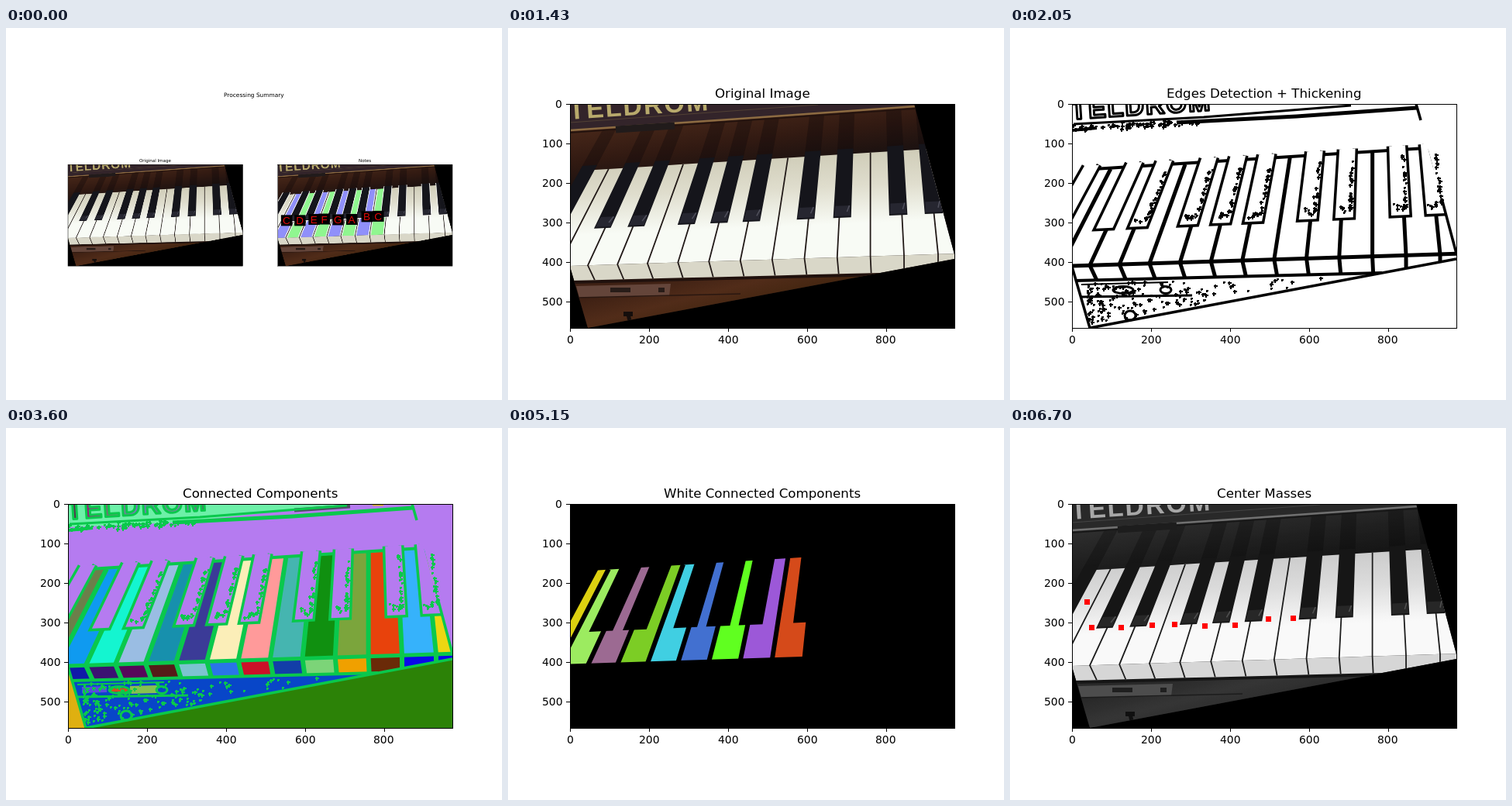
Animation, 640 px wide and 480 px high, one loop 8 s. Source, as an HTML page with a canvas:

```html
<!DOCTYPE html>
<html lang="en">
<head>
<meta charset="utf-8">
<title>Piano key detection</title>
<style>
html, body { margin: 0; width: 100%; height: 100%; overflow: hidden; background: #fff; }
canvas { display: block; width: 640px; height: 480px; }
</style>
</head>
<body>
<canvas id="stage" width="640" height="480"></canvas>
<script>
const W = 640, H = 480, LOOP = 8000;
const FONT = '"DejaVu Sans", Verdana, sans-serif';
const SANS = '"Liberation Sans", Arial, sans-serif';
const BOX = { x: 80, y: 98, w: 496, h: 289 };
const UNIT = 496 / 974;
const BRAND = 'TELDROM';

// Tilted photo inside the black plot area
const SHEET = [[80, 98], [524, 98], [576, 292], [576, 298], [103, 387], [80, 308]];
const WOOD = [[85, 326], [470, 317], [103, 387]];

// Perspective: u is x at the front edge, d runs from 0 (front) to 1 (back)
const topY = x => 182.5 - (x - 120) * 0.0625;
const frontY = x => 307 - (x - 80) * 0.032;
const baseY = x => 326 - (x - 80) * 0.025;
function spot(u, d) {
  const x = u + (468 - u) * 0.16 * d;
  return [x, frontY(x) + (topY(x) - frontY(x)) * d];
}
function lip(u) {
  const x = u + Math.max(0, (516 - u) * 0.0215);
  return [x, baseY(x)];
}
const gapX = i => 103 + 37.9 * i + 0.29 * i * i;

// Black keys lie on the gaps, spread apart within their groups of two and three
const SPREAD = [-4, 4, null, -5, 0, 4, null];
const blacks = [];
for (let i = -2; i < 12; i++) {
  const shift = SPREAD[(i + 7) % 7];
  if (shift !== null) blacks.push({ u: gapX(i) + shift, r: 11.5 + Math.max(0, i) * 0.1 });
}

const keyColors = '#6b7f4a #0f9af0 #14f5d0 #9abde3 #1790ad #3b3b97 #fbeeb8 #ff9a9a #45b5b0 #109010 #7ba53c #e8420c #36b2fb #ecd712'.split(' ');
const lipColors = '#1019a8 #3c1272 #57085a #551b18 #7dc3d0 #2a74e8 #cc1028 #123ea8 #7cd478 #f0a000 #6a2a08 #0a08e8 #0a08e8'.split(' ');
const whiteColors = '#ddd010 #9ceb60 #9c6a92 #7ccd25 #40cfe2 #4270d0 #60ff20 #9c58d8 #d54a1a'.split(' ');

function random(seed) {
  return () => {
    seed = (seed + 0x6D2B79F5) | 0;
    let t = Math.imul(seed ^ (seed >>> 15), 1 | seed);
    t = (t + Math.imul(t ^ (t >>> 7), 61 | t)) ^ t;
    return ((t ^ (t >>> 14)) >>> 0) / 4294967296;
  };
}

function layer(draw) {
  const cv = document.createElement('canvas');
  cv.width = W;
  cv.height = H;
  draw(cv.getContext('2d'));
  return cv;
}
function trace(c, pts) {
  c.beginPath();
  pts.forEach(([x, y], i) => i ? c.lineTo(x, y) : c.moveTo(x, y));
}
function fill(c, pts, color) {
  trace(c, pts);
  c.fillStyle = color;
  c.fill();
}
function line(c, pts, color, width) {
  trace(c, pts);
  c.strokeStyle = color;
  c.lineWidth = width;
  c.stroke();
}
function oval(c, x, y, rx, ry) {
  c.beginPath();
  c.ellipse(x, y, rx, ry, 0, 0, 7);
}
function fade(c, x1, y1, x2, y2, ...stops) {
  const g = c.createLinearGradient(x1, y1, x2, y2);
  stops.forEach((s, i) => g.addColorStop(i / (stops.length - 1), s));
  return g;
}
function backdrop(c, color) {
  c.beginPath();
  c.rect(BOX.x, BOX.y, BOX.w, BOX.h);
  c.clip();
  c.fillStyle = color;
  c.fillRect(0, 0, W, H);
}
// align: 0 left, 0.5 centre, 1 right
function text(c, str, x, y, size, align = 0.5) {
  c.font = size + 'px ' + FONT;
  c.fillStyle = '#000';
  c.fillText(str, Math.round(x - c.measureText(str).width * align), Math.round(y));
}

function brand(c, color, outline) {
  c.save();
  c.translate(79, 118);
  c.rotate(-0.066);
  c.font = 'bold 34px ' + SANS;
  c.letterSpacing = '2px';
  c.lineJoin = 'round';
  c.fillStyle = color;
  c.fillText(BRAND, 0, 0);
  if (outline) {
    c.strokeStyle = outline;
    c.lineWidth = 3;
    c.strokeText(BRAND, 0, 0);
  }
  c.restore();
}

// s: key(i), lip(i), edge, gap, rim, black, halo
function keyboard(c, s) {
  c.save();
  trace(c, SHEET);
  c.clip();
  for (let i = 0; i < 14; i++) {
    const a = gapX(i - 2), b = gapX(i - 1);
    if (s.key(i)) fill(c, [spot(a, 0), spot(a, 1), spot(b, 1), spot(b, 0)], s.key(i));
    if (s.lip(i)) fill(c, [spot(a, 0), spot(b, 0), lip(b), lip(a)], s.lip(i));
  }
  for (let i = -1; i < 12; i++) {
    const u = gapX(i);
    if (s.halo && i < 8) line(c, [spot(u, 0), spot(u, 1)], s.halo, 7);
    line(c, [lip(u), spot(u, 0), spot(u, 1)], s.edge, s.gap);
  }
  if (s.rim) {
    line(c, [spot(20, 1.01), spot(540, 1.01)], s.edge, 4);
    line(c, [[76, frontY(76)], [580, frontY(580)]], s.edge, 5);
    line(c, [[84, baseY(84)], [480, baseY(480)]], s.edge, 4);
  }
  const rims = blacks.map(({ u, r }) => [spot(u - r, 1.05), spot(u - r, 0.53), spot(u - r, 0.385),
    spot(u + r, 0.385), spot(u + r, 0.53), spot(u + r, 1.05)]);
  for (const rim of rims) {
    if (s.halo) line(c, rim, s.halo, 4);
    if (s.rim) line(c, rim, s.edge, s.rim);
  }
  for (const rim of rims) fill(c, rim, s.black);
  c.restore();
}

function photo(c, notes) {
  backdrop(c, '#000');
  c.save();
  trace(c, SHEET);
  c.clip();
  c.fillStyle = fade(c, 300, 105, 310, 185, '#472719', '#321a12', '#1a1110');
  c.fillRect(80, 98, 496, 289);
  for (const { u, r } of blacks) {
    fill(c, [spot(u - r, 1.4), spot(u + r, 1.4), spot(u + r, 1), spot(u - r, 1)], 'rgba(8,6,8,.3)');
  }
  fill(c, [[80, 98], [524, 98], [524, 100], [80, 132]], '#33242a');
  line(c, [[80, 122], [400, 99]], '#514034', 1);
  line(c, [[80, 132], [300, 117], [526, 101]], '#8c6b42', 2.4);
  line(c, [[80, 135], [526, 104]], '#24130e', 2);
  line(c, [[139, 131], [215, 126]], '#211b1b', 9);
  brand(c, '#b8aa6c');

  fill(c, [[80, 326], [480, 316], [480, 387], [80, 387]], fade(c, 200, 325, 215, 385, '#3f2114', '#512c19', '#42250f'));
  line(c, [[80, 328], [480, 318]], '#20110d', 4);
  fill(c, [[88, 333], [210, 330], [208, 346], [92, 348]], '#64453a');
  line(c, [[132, 338], [158, 338]], '#281c18', 6);
  line(c, [[194, 338], [202, 338]], '#281c18', 6);
  line(c, [[88, 348], [300, 343]], '#2a1710', 1.5);
  line(c, [[149, 369], [161, 369]], '#150e0c', 6);
  line(c, [[155, 369], [157, 378]], '#150e0c', 5);

  const ivory = fade(c, 300, 160, 304, 258, '#cdcab5', '#dfddcd', '#f8fbf5');
  keyboard(c, {
    key: i => notes && i > 0 && i < 9 ? (i % 2 ? '#9090fa' : '#90f690') : ivory,
    lip: () => '#d9d7c8',
    edge: '#221a18', gap: 1.8, rim: 0, black: '#15151b',
    halo: notes && '#f6f6f2'
  });
  for (const { u, r } of blacks) {
    fill(c, [spot(u - r + 2, 0.5), spot(u + r - 2, 0.5), spot(u + r - 1, 0.4), spot(u - r + 1, 0.4)], '#262630');
    line(c, [spot(u + r - 3, 0.5), spot(u + r - 6, 0.44)], '#50505c', 1.5);
  }
  c.restore();
}

// Lines and ragged marks left by the edge detector
function outline(c, color) {
  const rnd = random(11);
  const soft = () => rnd() + rnd() - 1;
  const mark = (x, y) => {
    const r = 1 + Math.floor(rnd() * 2);
    x = Math.round(x);
    y = Math.round(y);
    c.fillRect(x - r, y - 1, 2 * r + 1, 2);
    c.fillRect(x - 1, y - r, 2, 2 * r + 1);
  };
  line(c, [[80, 308], [103, 387], [576, 298]], color, 3.5);
  line(c, [[524, 98], [530, 119]], color, 3.5);
  line(c, [[557, 220], [576, 291]], color, 3.5);
  line(c, [[82, 124], [250, 115], [440, 100]], color, 3);
  line(c, [[215, 122], [370, 114], [525, 103]], color, 5);
  line(c, [[80, 132], [112, 129]], color, 4);
  line(c, [[92, 331], [204, 328]], color, 2);
  line(c, [[90, 347], [235, 345]], color, 3);
  oval(c, 146, 338, 13, 4.5);
  c.stroke();
  oval(c, 201, 338, 7, 4.5);
  c.stroke();
  oval(c, 155, 371, 7, 6);
  c.stroke();

  c.fillStyle = color;
  for (let i = 0; i < 90; i++) {
    const x = 82 + rnd() * 165;
    mark(x, 130 - (x - 80) * 0.05 + soft() * 5);
  }
  for (let i = 0; i < 170; i++) {
    const x = 100 + rnd() * rnd() * 320;
    const y1 = baseY(x) + 4, y2 = 383 - (x - 103) * 0.188;
    mark(x, y1 + (y2 - y1) * rnd());
  }
  for (const { u, r } of blacks.slice(2)) {
    for (let i = 0; i < 24; i++) mark(...spot(u + r - 4 + soft() * 3, 0.45 + rnd() * 0.5));
    for (let i = 0; i < 9; i++) mark(...spot(u + soft() * r, 0.46 + soft() * 0.04));
  }
}

function edges(c) {
  backdrop(c, '#fff');
  keyboard(c, { key: () => '#fff', lip: () => '#fff', edge: '#000', gap: 5, rim: 7, black: '#fff' });
  outline(c, '#000');
  brand(c, '#fff', '#000');
}

function components(c) {
  const green = '#0ac84c', violet = '#b57bf0';
  backdrop(c, violet);
  fill(c, [[80, 98], [440, 98], [220, 122], [80, 128]], '#6df0a8');
  line(c, [[372, 106], [444, 101]], '#4a5060', 5);
  line(c, [[473, 99], [487, 99]], '#d8b028', 3);
  fill(c, WOOD, '#0846c8');
  fill(c, [[103, 387], [576, 298], [576, 387]], '#2c8207');
  fill(c, [[80, 308], [103, 387], [80, 387]], '#dfb010');
  line(c, [[98, 338], [130, 337]], '#5a48e0', 8);
  line(c, [[134, 338], [157, 338]], '#d84a20', 5);
  line(c, [[160, 338], [196, 337]], '#86c050', 10);
  keyboard(c, { key: i => keyColors[i], lip: i => lipColors[i - 1], edge: green, gap: 6, rim: 7, black: violet });
  outline(c, green);
  brand(c, fade(c, 0, 0, 182, 0, '#343c34', '#a81888', '#68906c', '#8070c8', '#50a078', '#9a6cc0', '#407050'), green);
}

function whites(c) {
  backdrop(c, '#000');
  keyboard(c, { key: i => whiteColors[i], lip: () => null, edge: '#000', gap: 6, rim: 8, black: '#000' });
}

// Centre of mass of every coloured key
function findCenters(picture) {
  const { data } = picture.getContext('2d').getImageData(0, 0, W, H);
  return whiteColors.map(color => {
    const rgb = parseInt(color.slice(1), 16);
    let n = 0, sx = 0, sy = 0;
    for (let p = 0; p < W * H; p++) {
      if ((data[4 * p] << 16 | data[4 * p + 1] << 8 | data[4 * p + 2]) !== rgb) continue;
      n++;
      sx += p % W;
      sy += Math.floor(p / W);
    }
    return [Math.round(sx / n), Math.round(sy / n)];
  });
}

function masses(c) {
  backdrop(c, '#000');
  c.drawImage(plain, 0, 0);
  c.globalCompositeOperation = 'saturation';
  c.fillStyle = '#808080';
  c.fillRect(BOX.x, BOX.y, BOX.w, BOX.h);
  c.globalCompositeOperation = 'source-over';
  c.fillStyle = '#f00';
  for (const [x, y] of centers) c.fillRect(x - 3, y - 3, 7, 7);
}

function page(c) {
  c.fillStyle = '#fff';
  c.fillRect(0, 0, W, H);
}

function plot(title, picture) {
  return layer(c => {
    page(c);
    c.drawImage(picture, 0, 0);
    text(c, title, 328, 90, 16.67);
    c.strokeStyle = '#000';
    c.lineWidth = 1;
    c.strokeRect(80.5, 98.5, 496, 289);
    for (let v = 0; v <= 800; v += 200) {
      const x = 80.25 + v * UNIT, px = Math.round(x) + 0.5;
      line(c, [[px, 387], [px, 392]], '#000', 1);
      text(c, v, x, 407, 13.89);
    }
    for (let v = 0; v <= 500; v += 100) {
      const y = 98.3 + v * UNIT, py = Math.round(y) + 0.5;
      line(c, [[75, py], [80, py]], '#000', 1);
      text(c, v, 70.3, y + 5, 13.89, 1);
    }
  });
}

function summary(c) {
  const w = 225.5, h = 130.9, left = 80, right = 350.5, top = 176.3;
  page(c);
  text(c, 'Processing Summary', 320, 89, 7.41);
  for (const [pic, x, title] of [[plain, left, 'Original Image'], [noted, right, 'Notes']]) {
    c.drawImage(pic, BOX.x, BOX.y, BOX.w, BOX.h, x, top, w, h);
    c.strokeStyle = '#000';
    c.lineWidth = 0.5;
    c.strokeRect(x, top, w, h);
    text(c, title, x + w / 2, 173.4, 5.56);
  }
  const tags = [...'CDEFGABC'].map((note, i) => {
    const [x, y] = centers[i + 1];
    return [note, right + (x - BOX.x) * w / BOX.w, top + (y - BOX.y) * h / BOX.h];
  });
  c.fillStyle = '#000';
  for (const [, x, y] of tags) c.fillRect(x - 7, y - 7, 14.5, 14);
  c.fillStyle = '#e00808';
  c.font = '13.5px ' + SANS;
  c.textAlign = 'center';
  for (const [note, x, y] of tags) c.fillText(note, x, y + 5);
}

const plain = layer(c => photo(c, false));
const noted = layer(c => photo(c, true));
const whiteKeys = layer(whites);
const centers = findCenters(whiteKeys);
const SCENES = [
  [0, layer(summary)],
  [500, plot('Original Image', plain)],
  [2050, plot('Edges Detection + Thickening', layer(edges))],
  [3600, plot('Connected Components', layer(components))],
  [5150, plot('White Connected Components', whiteKeys)],
  [6700, plot('Center Masses', layer(masses))]
];

const stage = document.getElementById('stage').getContext('2d');
const start = performance.now();

function tick() {
  const t = (performance.now() - start) % LOOP;
  let shown = SCENES[0][1];
  for (const [from, picture] of SCENES) if (t >= from) shown = picture;
  stage.drawImage(shown, 0, 0);
  requestAnimationFrame(tick);
}
tick();
</script>
</body>
</html>
```
